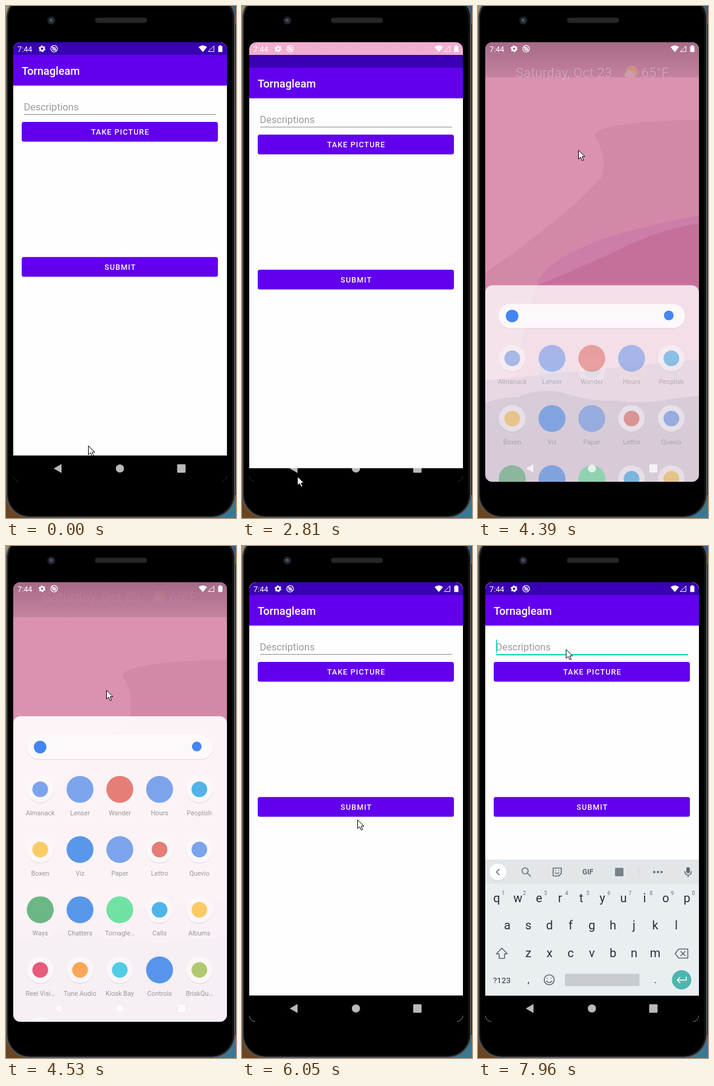
These frames come from a looping animation (381x848 px, 8000 ms). An HTML page:

```html
<!DOCTYPE html>
<html lang="en">
<head>
<meta charset="utf-8">
<title>Handset demo</title>
<style>
html, body { margin: 0; width: 100%; height: 100%; overflow: hidden; background: #000; }
svg { display: block; width: 381px; height: 848px; font-family: Roboto, sans-serif; }
.mid { text-anchor: middle; }
.btn { font-size: 12.5px; font-weight: 500; letter-spacing: 1.1px; fill: #fff; text-anchor: middle; }
.label { font-size: 10.8px; fill: #757575; text-anchor: middle; }
.key { font-size: 20px; fill: #263238; text-anchor: middle; }
.hint { font-size: 8.5px; fill: #5f6b70; text-anchor: middle; }
.date { font-size: 22.2px; fill: #fff; text-shadow: 0 0 2px #0007; }
.line { fill: none; stroke: #5f6b70; stroke-width: 1.6; stroke-linejoin: round; stroke-linecap: round; }
</style>
</head>
<body>
<svg id="stage" viewBox="0 0 381 848"></svg>
<script>
const LOOP = 8000, STEP = 120;

const rect = (x, y, w, h, fill, rx = 0, more = "") =>
  `<rect x="${x}" y="${y}" width="${w}" height="${h}" rx="${rx}" fill="${fill}" ${more}/>`;
const disc = (x, y, r, fill, more = "") =>
  `<circle cx="${x}" cy="${y}" r="${r}" fill="${fill}" ${more}/>`;
const path = (d, fill, more = "") => `<path d="${d}" fill="${fill}" ${more}/>`;
const line = (d, more = "") => `<path class="line" d="${d}" ${more}/>`;
const text = (x, y, s, cls = "", more = "") => `<text x="${x}" y="${y}" class="${cls}" ${more}>${s}</text>`;
const group = (id, ...parts) => `<g id="${id}">${parts.join("")}</g>`;
const lerp = (a, b, k) => a + (b - a) * k;
const repeat = (n, make) => Array.from({ length: n }, (_, i) => make(i)).join("");
const fadeDown = (id, top, bottom) => `<linearGradient id="${id}" x2="0" y2="1">
  <stop stop-color="${top}"/><stop offset="1" stop-color="${bottom}"/></linearGradient>`;

const FLOOR = "V788H12Z";
const RIDGE = "M12 657Q40 647 65 648Q100 632 140 640Q185 656 225 653Q270 660 320 651L366 645" + FLOOR;
const SLOPE = "M12 620L366 585" + FLOOR;

const body = [
  rect(0, 0, 190, 40, "#a3956b"), rect(190, 0, 191, 40, "#2a5c94"),
  rect(0, 780, 190, 68, "#6b4520"), rect(190, 780, 191, 68, "#3a7890"),
  rect(0, 30, 381, 780, "#17181a"),
  rect(1, -18, 378, 865, "#141516", 38, 'stroke="#55575a" stroke-width="2"'),
  rect(4, -14, 371, 858, "#000", 35),
  rect(147.5, 19.5, 86, 8.5, "#262626", 4, 'stroke="#161616"'),
  disc(75, 24, 6.5, "#22252b"), disc(75, 24, 3, "#36435a"), disc(74, 23, 1, "#6f86a8")
].join("");

// Tilted bands that darken from pink to purple.
const dusk = repeat(8, i => {
  const k = i / 7, y = 526 + i * 16;
  const rgb = [lerp(216, 80, k), lerp(122, 38, k), lerp(161, 112, k)];
  return path(`M12 ${y}L366 ${y - lerp(60, 12, k)}` + FLOOR, `rgb(${rgb})`);
});

const wallpaper = [
  rect(12, 60, 354, 728, "url(#sky)"),
  path("M12 130Q60 118 100 140Q74 205 98 245Q122 275 104 315Q70 375 12 410Z", "#f8b1c9"),
  path("M12 452Q60 422 140 392Q240 352 280 305Q305 278 343 271L366 255" + FLOOR, "#e792b3"),
  path("M262 447Q262 405 310 396Q345 388 366 374V432Z", "#d889b6"),
  path("M12 538Q150 520 215 482Q268 455 262 446L366 428" + FLOOR, "#db7fa3"),
  dusk
].join("");

const dim = [
  rect(12, 60, 354, 728, "#d488a8"),
  path("M12 60H366V188Q195 192 193 215Q215 250 204 285Q150 345 12 442Z", "#da92b0"),
  path("M97 463Q110 420 210 385Q290 360 366 347" + FLOOR, "#cc7da8"),
  path("M97 463Q190 425 230 405Q300 370 366 360" + FLOOR, "#c5709a"),
  path(SLOPE, "#854c80"),
  rect(12, 60, 354, 58, "url(#shade)")
].join("");

// A launcher icon: a full coloured disc, or a small mark on a white disc.
const icon = (x, y, colour, onWhite) => onWhite
  ? disc(x, y + 1.2, 22, "#0002") + disc(x, y, 22, "#fdf9fb") + disc(x, y, 13, colour)
  : disc(x, y, 22.3, colour);

const home = [
  text(62, 147, "Saturday, Oct 23", "date"), text(270.5, 147, "65°F", "date"),
  disc(255, 138, 10, "#fbd437"),
  path("M247 147a4 4 0 0 1 0-8a6 6 0 0 1 11 1a3.7 3.7 0 0 1 0 7Z", "#eee9e4"),
  icon(123, 634, "#1a73e8"), icon(189, 634, "#12bfe0", 1), icon(255, 634, "#dc5145")
].join("");

const BLUE = "#4a86e8", DEEP = "#1a73e8", SKY = "#0f9be5", RED = "#dc5145", GOLD = "#fbbc2d";
const shelf = [
  ["Almanack", BLUE, 1], ["Lenser", BLUE], ["Wander", RED], ["Hours", BLUE], ["Peoplish", SKY, 1],
  ["Boxen", GOLD, 1], ["Viz", DEEP], ["Paper", BLUE], ["Lettro", RED, 1], ["Quevio", BLUE, 1],
  ["Ways", "#34a05a"], ["Chatters", DEEP], ["Tornagle…", "#3ddc84"], ["Calls", SKY, 1], ["Albums", GOLD, 1],
  ["Reel Visi…", "#e0214d", 1], ["Tune Audio", "#fb8c1a", 1], ["Kiosk Bay", "#12bfe0", 1], ["Controls", DEEP],
  ["BriskQu…", "#96bb3a", 1], ["Vidloom", "#f00", 1]
].map(([name, colour, onWhite], i) => {
  const x = 56.7 + i % 5 * 65.9, y = 185 + Math.floor(i / 5) * 99.7;
  return icon(x, y, colour, onWhite) + text(x, y + 43, name, "label");
}).join("");

const search = [
  rect(34, 96.2, 309, 40, "#0002", 20, 'id="barShadow"'),
  rect(34, 95, 309, 40, "#fdf8fa", 20, 'id="bar"'),
  disc(56.5, 115, 10.5, "#4285f4"), disc(316, 114, 8, "#4285f4")
].join("");

const nav = `<g fill="#fff" stroke="#0001" opacity=".73">
  <path d="M79 766L92 758.5V773.5Z"/><circle cx="188.7" cy="766" r="6.8"/>
  <rect x="283.5" y="759" width="14" height="14" rx="1.5"/></g>`;

const button = (y, label) =>
  rect(26, y + 1, 325, 32.5, "#0003", 3.5) + rect(26, y, 325, 32.5, "#6200ee", 3.5) +
  text(189.3, y + 21, label, "btn");

const app = [
  rect(12, 60, 354, 684.5, "#fefefe"),
  rect(12, 60, 354, 21.3, "#3a00b3"),
  group("toolbar",
    rect(12, 132, 354, 1, "#0002"), rect(12, 81, 354, 50.7, "#6200ee"),
    text(26, 114, "Tornagleam", "", 'font-size="18.2" font-weight="500" fill="#fff"')),
  group("form",
    text(29.6, 173, "Descriptions", "", 'font-size="16.3" fill="#9b9b9b"'),
    rect(30, 179, 318, 1, "#8c8c8c"),
    group("focus", rect(30, 179, 318, 2, "#10d3c0"), rect(30, 155, 1.6, 22, "#10d3c0")),
    button(192, "TAKE PICTURE"), button(415.7, "SUBMIT"))
].join("");

const status = `<g fill="none" stroke="#fff">` + [
  text(19, 75.6, "7:44", "", 'font-size="12.7" fill="#fff" stroke="none"'),
  disc(59.7, 70.8, 3.2, "none", 'stroke-width="2.4"'),
  disc(59.7, 70.8, 4.7, "none", 'stroke-width="1.8" stroke-dasharray="2.5 2.42"'),
  disc(79.7, 70.8, 5.4, "none", 'stroke-width="1.3"'),
  disc(79.7, 70.8, 2.3, "none", 'stroke-width="1.2"'), path("M76 67L83.5 74.5", "none", 'stroke-width="1.3"'),
  path("M319 68Q326 62.5 333 68L326 76.3Z", "#fff", 'stroke="none"'),
  path("M344.5 66V75.5H335Z", "none"),
  path("M351.5 66.5h2v-1.5h3v1.5h2v9.7h-7Z", "#fff", 'stroke="none"')
].join("") + "</g>";

const keyRow = (letters, x, y, cls = "key") =>
  repeat(letters.length, i => text(x + i * 35, y, letters[i], cls));

const keyboard = [
  rect(12, 519.5, 354, 225, "#e9eef1"), rect(12, 519.5, 354, 40, "#e3e6e8"),
  disc(33, 541, 14, "#0002"), disc(33, 540, 14, "#fff"), line("M35 535.5L30.5 540L35 544.5"),
  disc(78, 538, 5, "none", 'class="line"'), line("M82 542L87 547"),
  line("M124.5 533.5H138V542L134 546.5H124.5ZM128 541Q131 544 134 541M128.5 537.5h.1M133.5 537.5h.1"),
  text(182, 544, "GIF", "mid", 'font-size="12" font-weight="700" fill="#5f6b70"'),
  rect(227, 533, 14, 14, "#77828a", 1.5), rect(265.5, 530, 1, 20, "#cfd4d7"),
  repeat(3, i => disc(292 + i * 6, 540, 1.9, "#5f6b70")),
  rect(345, 532, 6, 10, "#5f6b70", 3), line("M342.5 539Q343 545 348 545Q353 545 353.5 539M348 545V548"),
  keyRow("qwertyuiop", 31, 590), keyRow("1234567890", 42, 577.5, "hint"),
  keyRow("asdfghjkl", 48.5, 635), keyRow("zxcvbnm", 83.5, 681),
  line("M39.5 666L48.5 675.5H44V683H35V675.5H30.5Z"),
  line("M326.5 675L332.5 667.5H347.5V682.5H332.5ZM336 671.5L343 678.5M343 671.5L336 678.5"),
  text(39.5, 723.5, "?123", "mid", 'font-size="13.5" fill="#263238"'),
  text(83.5, 724, ",", "key", 'style="font-size:16px"'), text(293.5, 724, ".", "key", 'style="font-size:16px"'),
  disc(118, 718.5, 8.3, "none", 'class="line"'),
  line("M113.5 720.5Q118 726 122.5 720.5M115 716h.1M121 716h.1"),
  rect(144, 708.5, 123.5, 20.5, "#c8ccd0", 2),
  disc(337.3, 718.5, 16, "#4db6ac"),
  line("M345 714V719H330.5M334.5 714.5L330 719L334.5 723.5", 'style="stroke:#fff"')
].join("");

stage.innerHTML = `<defs>
  ${fadeDown("sky", "#f1aed1", "#f09fbc")}${fadeDown("ground", "#2d0449", "#230033")}
  ${fadeDown("shade", "#40203858", "#40203822")}
  <clipPath id="screen"><rect x="12" y="60" width="354" height="728" rx="12"/></clipPath>
  </defs>${body}<g clip-path="url(#screen)">` + [
  wallpaper, group("dim", dim), path(RIDGE, "url(#ground)"), group("home", home),
  group("sheet", rect(12, 64, 354, 760, "#fdf7f9", 12)),
  group("haze", path(SLOPE, "#f2edf2"), path(RIDGE, "#e9e7ed"), rect(12, 744, 354, 44, "#fdf6f8")),
  group("drawer", search, group("shelf", shelf)),
  rect(12, 744, 354, 44, "#000", 0, 'id="navBack"'), nav,
  group("app", app), group("keys", keyboard), status
].join("") + "</g>" +
  path("M0 0V14.6L3.5 11.4L6 17L8.4 16L6 10.5H10.6Z", "#fff", 'id="pointer" stroke="#000"');

// Pointer glides: first step, last step, end point.
const START = [136.5, 728.5];
const glides = [
  [120, 480, 95, 776], [730, 990, 100, 737], [1240, 1390, 62, 770], [1540, 1940, 91, 762],
  [2440, 2560, 92, 779.5], [3570, 3570, 208.5, 554.5], [3720, 4120, 165, 185], [4270, 4390, 166.5, 239],
  [4680, 5160, 188.5, 411], [5410, 5410, 187.5, 396.5], [5560, 5680, 191.5, 453.5],
  [6560, 6920, 166.5, 203], [7070, 7190, 146, 171.5]
];

// Progress 0..1 in even steps; the first step shows at `first`, the final one near `last`.
function steps(t, first, last) {
  const count = Math.round((last - first) / STEP) + 1;
  const done = Math.floor((t - first) / STEP) + 1;
  return Math.max(0, Math.min(1, done / count));
}

const el = id => document.getElementById(id);
const fade = (id, a) => el(id).setAttribute("opacity", a);
const move = (id, x, y, scale = 1) =>
  el(id).setAttribute("transform", `translate(${x} ${y}) scale(${scale})`);

function drawApp(t) {
  const closing = steps(t, 2810, 3170), opening = steps(t, 5560, 5680), reveal = steps(t, 5930, 6050);
  const scale = opening ? lerp(.2, 1, opening) : 1;
  const shift = opening ? 0 : 42 * Math.sqrt(closing);
  const alpha = opening ? 1 : Math.min(1, (1 - closing) * 4 / 3);
  move("app", 188.5 * (1 - scale), shift + 410 * (1 - scale), scale);
  fade("app", alpha);
  fade("navBack", opening ? Math.floor(opening) : alpha);
  fade("toolbar", opening ? Math.ceil(reveal) : 1);
  fade("form", opening ? reveal : 1);
  fade("focus", t >= 7570 ? 1 : 0);
}

function drawDrawer(t) {
  const pull = steps(t, 4270, 4680);
  const rise = 603 * (1 - pull ** 1.56);
  const solid = Math.min(1, pull * 2);
  move("drawer", 0, rise);
  move("sheet", 0, rise - 16 * Math.floor(pull));
  move("home", 0, (rise - 603) / 7);
  fade("sheet", 1 - (1 - pull) ** 2.5);
  fade("haze", Math.floor(pull));
  fade("shelf", pull ** 1.15);
  fade("barShadow", pull);
  fade("bar", lerp(.82, 1, solid));
  fade("home", (1 - pull) ** 2);
  fade("dim", solid);
}

function drawPointer(t) {
  const [x, y] = glides.reduce(([x, y], [first, last, toX, toY]) => {
    const k = steps(t, first, last);
    return [lerp(x, toX, k), lerp(y, toY, k)];
  }, START);
  move("pointer", x, y);
}

function drawKeys(t) {
  const up = steps(t, 7840, 7960);
  move("keys", 0, 96 * (1 - up));
  fade("keys", Math.ceil(up));
}

const start = performance.now();
function tick() {
  const t = (performance.now() - start) % LOOP;
  for (const part of [drawApp, drawDrawer, drawPointer, drawKeys]) part(t);
  requestAnimationFrame(tick);
}
tick();
</script>
</body>
</html>
```
